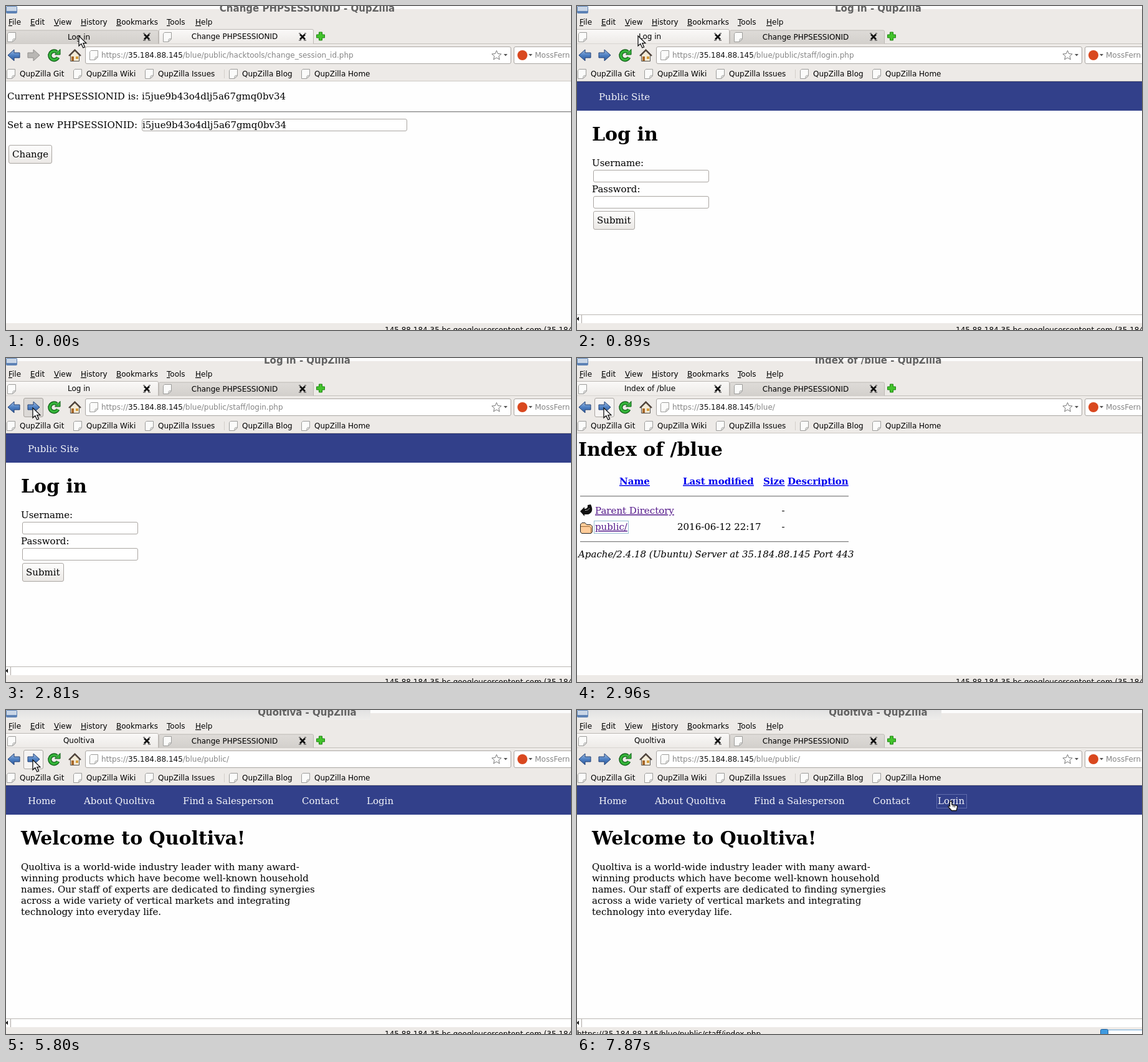
These frames come from a looping animation (907x520 px, 8 s). An HTML page:

```html
<!DOCTYPE html>
<html lang="en">
<head>
<meta charset="utf-8">
<title>Browser session</title>
<style>
html, body { margin: 0; width: 100%; height: 100%; overflow: hidden; background: #edeae7; }
svg { display: block; width: 907px; height: 520px; }
text { white-space: pre; }
.ui { font: 12px "DejaVu Sans", sans-serif; }
.title { font: bold 15px "DejaVu Sans", sans-serif; fill: #626262; text-anchor: middle; }
.mid { text-anchor: middle; }
.dim { fill: #858585; }
.doc { font: 15px "DejaVu Serif", serif; }
.h1 { font: bold 30px "DejaVu Serif", serif; }
.th { font: bold 15px "DejaVu Serif", serif; fill: #0000ee; text-decoration: underline; }
.link { fill: #551a8b; text-decoration: underline; }
.nav { fill: #f4f5fa; }
.it { font-style: italic; }
.u { text-decoration: underline; }
</style>
</head>
<body>
<svg id="stage" viewBox="0 0 907 520" xmlns="http://www.w3.org/2000/svg">
  <defs>
    <linearGradient id="btn" x2="0" y2="1"><stop stop-color="#fefefe"/><stop offset="1" stop-color="#ebe8e5"/></linearGradient>
    <linearGradient id="blue" x2="0" y2="1"><stop stop-color="#a3c0e6"/><stop offset=".5" stop-color="#4f80c2"/><stop offset="1" stop-color="#2f5c9f"/></linearGradient>
    <linearGradient id="on" x2="0" y2="1"><stop stop-color="#faf9f8"/><stop offset="1" stop-color="#edeae7"/></linearGradient>
    <linearGradient id="off" x2="0" y2="1"><stop stop-color="#dedbd8"/><stop offset="1" stop-color="#d3d0cc"/></linearGradient>
    <linearGradient id="bar" x2="0" y2="1"><stop stop-color="#e2e2e2"/><stop offset="1" stop-color="#eeedeb"/></linearGradient>
  </defs>
</svg>
<script>
const LOOP = 8000;
const HOST = '35.184.88.145';
const FIRM = 'Quoltiva';
const svg = document.getElementById('stage');

// Markup helpers
const text = (x, y, s, cls = 'ui') => `<text x="${x}" y="${y}" class="${cls}">${s}</text>`;
const rect = (x, y, w, h, fill, more = '') => `<rect x="${x}" y="${y}" width="${w}" height="${h}" fill="${fill}" ${more}/>`;
const path = (d, fill, more = '') => `<path d="${d}" fill="${fill}" ${more}/>`;
const box = (x, y, w, h, fill = '#fff', rx = 2.5, stroke = '#aaa6a2') =>
  rect(x + .5, y + .5, w - 1, h - 1, fill, `rx="${rx}" stroke="${stroke}"`);
const dots = (x, y, w, h, color) =>
  rect(x + .5, y + .5, w - 1, h - 1, 'none', `stroke="${color}" stroke-dasharray="1 1"`);
const sheet = (x, y) =>
  path(`M${x + 2.5},${y + .5}H${x + 13.5}V${y + 11}L${x + 9},${y + 15.5}H${x + .5}V${y + 2.5}Z`, '#fbfbfa', 'stroke="#9c9c9a"') +
  path(`M${x + 13.5},${y + 10.5}Q${x + 8},${y + 9} ${x + 8.5},${y + 15.5}Z`, '#dededc', 'stroke="#a8a8a6" stroke-width=".8"');
const caret = (x, y) => path(`M${x},${y}h6l-3,3.5z`, '#555');
const cross = (x, y) =>
  path(`M${x - 4},${y - 4}l8,8M${x + 4},${y - 4}l-8,8`, 'none', 'stroke="#111" stroke-width="2.8"') +
  path(`M${x - 6},${y + 5.5}h4M${x + 2},${y + 5.5}h4M${x - 6},${y - 5.5}h3M${x + 3},${y - 5.5}h3`, 'none', 'stroke="#222" stroke-width="1.2"');

function layer(html = '') {
  const g = document.createElementNS('http://www.w3.org/2000/svg', 'g');
  g.innerHTML = html;
  svg.append(g);
  return g;
}
const show = (g, on) => g.setAttribute('visibility', on ? 'visible' : 'hidden');

// Page contents
const navBar = items =>
  rect(0, 122, 907, 46, '#32408a') + rect(0, 121, 907, 1, '#28336f') +
  items.map(([x, s]) => text(x, 151, s, 'doc nav')).join('') +
  rect(0, 495, 907, 1, '#bbb8b4') + rect(0, 496, 907, 13, '#fff') +
  rect(7, 496, 1, 13, '#aaa6a2') + path('M3,498.5v7l-3.5,-3.5z', '#111');
const rule = (x, y, w) => rect(x, y, w, 1, '#858585') + rect(x, y + 1, w, 1, '#d8d8d8');

const pages = {
  change: {
    title: 'Change PHPSESSIONID', url: '/blue/public/hacktools/change_session_id.php',
    body: text(2, 150, 'Current PHPSESSIONID is: i5jue9b43o4dlj5a67gmq0bv34', 'doc') +
      rule(2, 169, 905) + text(2, 196, 'Set a new PHPSESSIONID:', 'doc') +
      box(218, 181, 426, 20) + text(219, 196, 'i5jue9b43o4dlj5a67gmq0bv34', 'doc') +
      box(4, 223, 70, 30, 'url(#btn)') + text(10, 243, 'Change', 'doc')
  },
  login: {
    title: 'Log in', url: '/blue/public/staff/login.php',
    body: navBar([[35, 'Public Site']]) + text(24, 216, 'Log in', 'h1') +
      text(24, 257, 'Username:', 'doc') + box(26, 263, 186, 20) +
      text(24, 299, 'Password:', 'doc') + box(26, 305, 186, 20) +
      box(26, 329, 67, 30, 'url(#btn)') + text(32, 349, 'Submit', 'doc')
  },
  index: {
    title: 'Index of /blue', url: '/blue/',
    body: text(2, 157, 'Index of /blue', 'h1') +
      [[68, 'Name'], [170, 'Last modified'], [299, 'Size'], [338, 'Description']].map(([x, s]) => text(x, 203, s, 'th')).join('') +
      rule(5, 221, 431) + rule(5, 294, 431) +
      path('M5,246L12,239V242Q18,242 17,236L22,235Q28,247 18,251L12,251V254Z', '#111') +
      path('M13,244.5Q18,245 20,241', 'none', 'stroke="#aaa"') +
      text(29, 250, 'Parent Directory', 'doc link') + text(328.5, 250, '-', 'doc') +
      path('M5.5,279V267L8,264.5H13L15.5,267.5H22L24.5,270V279L22.5,281.5H7.5Z', '#ffcc99', 'stroke="#222"') +
      path('M6,270.5H20.5L22.5,273V281', 'none', 'stroke="#9c6a35"') +
      text(29, 276, 'public/', 'doc link') + dots(27, 261, 56, 21, '#2f7fa6') +
      text(161, 276, '2016-06-12 22:17', 'doc') + text(328.5, 276, '-', 'doc') +
      text(2, 320, `Apache/2.4.18 (Ubuntu) Server at ${HOST} Port 443`, 'doc it')
  },
  home: {
    title: FIRM, url: '/blue/public/',
    body: navBar([[35, 'Home'], [125, 'About ' + FIRM], [284, 'Find a Salesperson'], [475, 'Contact'], [579, 'Login']]) +
      text(24, 216, `Welcome to ${FIRM}!`, 'h1') +
      [FIRM + ' is a world-wide industry leader with many award-',
        'winning products which have become well-known household',
        'names. Our staff of experts are dedicated to finding synergies',
        'across a wide variety of vertical markets and integrating',
        'technology into everyday life.'].map((s, i) => text(24, 257 + 18 * i, s, 'doc')).join('')
  }
};

// Window parts that never change
layer(
  rect(0, 0, 907, 520, '#edeae7') + rect(0, 0, 907, 5, '#fcfcfc') +
  [[4, 'File'], [39, 'Edit'], [77, 'View'], [120, 'History'], [177, 'Bookmarks'], [258, 'Tools'], [304, 'Help']]
    .map(([x, s]) => text(x, 30, `<tspan class="u">${s[0]}</tspan>${s.slice(1)}`)).join('') +
  rect(0, 60, 907, 1, '#c6c2be') +
  box(127, 65, 684, 28) + sheet(134, 71) +
  path('M787.5,71.5l2.2,5 5.4,.5 -4.1,3.6 1.3,5.3 -4.8,-2.9 -4.8,2.9 1.3,-5.3 -4.1,-3.6 5.4,-.5z', '#fff', 'stroke="#767676"') +
  caret(799, 77) + box(815, 65, 120, 28) +
  '<circle cx="829" cy="79" r="8" fill="#d9481f"/>' + caret(839, 77) +
  text(849, 83, 'MossFern', 'ui dim') +
  path('M3,79L13,70V75H22V83H13V88Z', 'url(#blue)', 'stroke="#1f3f74" stroke-linejoin="round"') +
  ['#0d5a14" stroke-width="6', '#35b53a" stroke-width="3.6'].map(s =>
    path('M83.5,82.5A7,7 0 1 1 81.5,73.8', 'none', `stroke="${s}"`)).join('') +
  path('M87,69.5V78H78.5Z', '#35b53a', 'stroke="#0d5a14"') +
  path('M103.5,79V88.5H117.5V79L110.5,72Z', '#f3ead6', 'stroke="#55524c"') +
  path('M101,80L110.5,70.5L120,80', 'none', 'stroke="#4d4038" stroke-width="2.2"') +
  rect(105, 81, 4, 7, '#a8692c') + rect(112, 81, 4, 4, '#d49b38') +
  [[1, 'QupZilla Git'], [108, 'QupZilla Wiki'], [223, 'QupZilla Issues'], [358, 'QupZilla Blog'], [474, 'QupZilla Home']]
    .map(([x, s]) => sheet(x, 101) + text(x + 21, 113, s)).join('') +
  rect(350, 102, 1, 14, '#d3cfca') + rect(0, 120, 907, 1, '#cdc9c5') +
  rect(0, 121, 907, 388, '#fefefe')
);

// One layer for each page, with its title, tabs and address
for (const [name, p] of Object.entries(pages)) {
  const second = name === 'change';
  const tab = (x, w, on, label, mid) => {
    const top = on ? 37 : 38.5;
    return path(`M${x + .5},60.5V${top + 2}Q${x + .5},${top + .5} ${x + 3},${top + .5}H${x + w - 3}Q${x + w - .5},${top + .5} ${x + w - .5},${top + 2}V60.5`,
      `url(#${on ? 'on' : 'off'})`, 'stroke="#bdb9b5"') +
      sheet(x < 0 ? 2 : x + 7, 42) + text(mid, on ? 53 : 54, label, 'ui mid') + cross(mid + 109, 49.5);
  };
  p.layer = layer(
    (name === 'home' ? rect(0, 0, 585, 16, 'url(#bar)') : '') +
    text(483.5, 9, p.title + ' - QupZilla', 'title') +
    tab(-3, 248, !second, second ? 'Log in' : p.title, 117) +
    tab(245, 249, second, 'Change PHPSESSIONID', 367) +
    text(153, 83, `https://<tspan fill="#111">${HOST}</tspan>${p.url}`, 'ui dim') + p.body
  );
}
layer(
  rect(0, 0, 18, 12, '#5d82b5', 'rx="2"') + rect(1, 1, 16, 7, '#c9d6e6') +
  path('M502.5,42h5v4h4v5h-4v4h-5v-4h-4v-5h4z', '#43c32c', 'stroke="#1f8413"')
);

const hoverBtn = layer(box(28, 64, 32, 31, '#f6f4f3'));
const pressBtn = layer(box(28, 64, 32, 31, '#dcd9d6', 2.5, '#a5a19c'));
const arrowShape = 'M54,79L44,70V75H35V83H44V88Z';
const fwdOn = layer(path(arrowShape, 'url(#blue)', 'stroke="#1f3f74" stroke-linejoin="round"'));
const fwdOff = layer(path(arrowShape, '#b9b7b4', 'stroke="#8f8d8a" stroke-linejoin="round"'));

layer(rect(0, 509, 907, 11, '#edeae7'));
const hostText = layer(text(608, 524, `145.88.184.35.bc.googleusercontent.com (${HOST})`));
const linkText = layer(text(0, 524, `https://${HOST}/blue/public/staff/index.php`));
const progress = layer(
  box(840, 513, 80, 12, '#fff', 2, '#6aa7d8') + box(840, 512, 13, 14, '#3f9ae0', 2, '#1d5c98')
);
const focus = layer(dots(577, 135, 49, 23, '#8f98cc'));

const pointer = layer(path('M0,0V16L3.8,12.6L6.8,19L9.6,17.8L6.8,11.6H11.8Z', '#fff', 'stroke="#111" stroke-width="1.3"'));
const hand = layer(path('M-1.5,0Q.3,-1.6 1.8,0V5L9,6.2Q11,7 10.5,9L9,14.5H1.5L-4,8.5Q-4,6 -1.5,7.5Z', '#fff', 'stroke="#111" stroke-width="1.3"') +
  path('M4,6v3M6.5,6.3v3', 'none', 'stroke="#111"'));

// Step tracks: [start time, value]
const tracks = {
  page: [[0, 'change'], [890, 'login'], [2960, 'index'], [5653, 'home']],
  button: [[0, ''], [2810, 'press'], [2960, 'hover'], [5360, 'press'], [5507, 'hover'], [7435, '']],
  load: [[0, false], [5507, true], [5800, false], [7870, true]],
  link: [[0, false], [7435, true]],
  focus: [[0, false], [7725, true]],
  cursor: [
    [0, [117, 48]], [150, [112, 45]], [295, [104, 42]], [440, [98, 48]],
    [1340, [105, 75]], [1486, [115, 140]], [1631, [121, 215]], [1777, [121, 264]],
    [1923, [112, 245]], [2069, [88, 182]], [2214, [62, 118]], [2360, [43, 80]],
    [6550, [235, 128]], [6700, [414, 173]], [6990, [575, 191]], [7290, [600, 147]]
  ]
};
const at = (name, t) => tracks[name].findLast(step => step[0] <= t)[1];

function draw(t) {
  const page = at('page', t), button = at('button', t);
  const load = at('load', t), link = at('link', t);
  const [x, y] = at('cursor', t);
  for (const name in pages) show(pages[name].layer, name === page);
  show(hoverBtn, button === 'hover');
  show(pressBtn, button === 'press');
  show(fwdOn, page !== 'change');
  show(fwdOff, page === 'change');
  show(hostText, !load);
  show(progress, load);
  show(linkText, link);
  show(focus, at('focus', t));
  show(pointer, !link);
  show(hand, link);
  for (const g of [pointer, hand]) g.setAttribute('transform', `translate(${x} ${y})`);
}

const start = performance.now();
function tick() {
  draw((performance.now() - start) % LOOP);
  requestAnimationFrame(tick);
}
tick();
</script>
</body>
</html>
```
